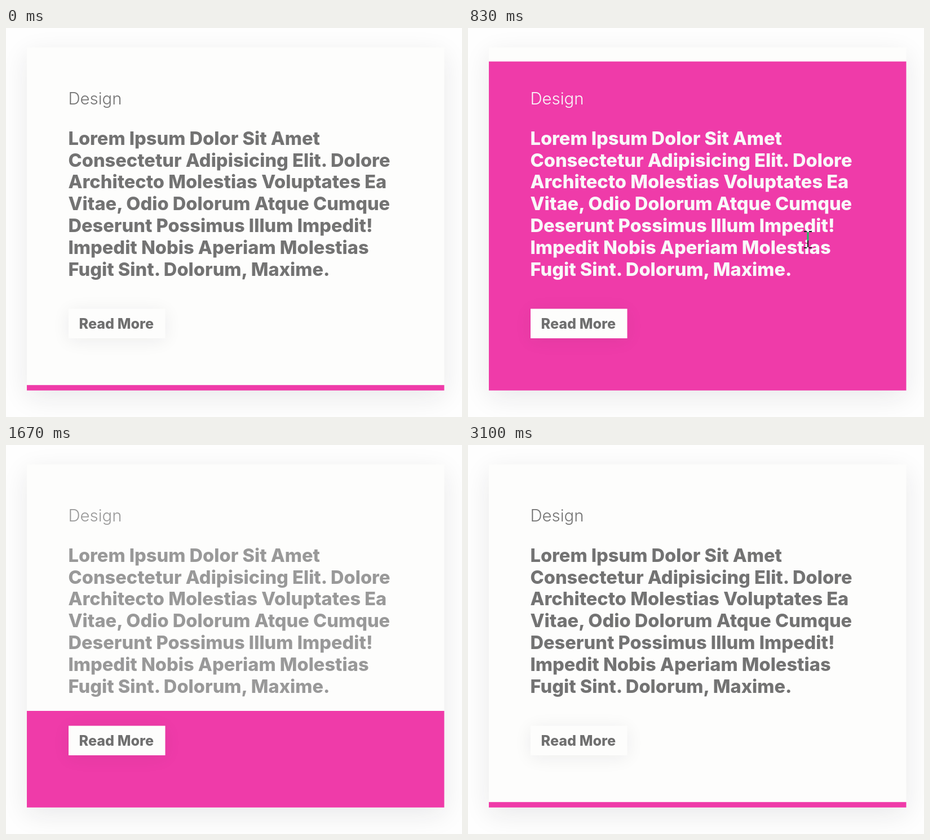
An HTML page for the animation above (3130 ms loop, 809 by 692 pixels).

```html
<!DOCTYPE html>
<html lang="en">
<head>
<meta charset="utf-8">
<title>Card hover</title>
<style>
  html, body { margin: 0; width: 100%; height: 100%; overflow: hidden; background: #fefefe; }
  svg { display: block; width: 809px; height: 692px; }
  text { font-family: Inter, "Open Sans", sans-serif; font-weight: 800; }
  #label { font-size: 29.3px; font-weight: 300; }
  #heading { font-size: 32.6px; }
  #more { font-size: 25.2px; fill: #6f6f6f; }
  #beam { fill: none; stroke: #10251a; stroke-width: 2; }
</style>
</head>
<body>
<svg viewBox="0 0 809 692">
  <defs>
    <filter id="wide" x="-20%" y="-20%" width="140%" height="140%"><feGaussianBlur stdDeviation="24"/></filter>
    <filter id="soft" x="-50%" y="-100%" width="200%" height="300%"><feGaussianBlur stdDeviation="16"/></filter>
  </defs>
  <rect width="809" height="692" fill="#fefefe"/>
  <rect x="37" y="47" width="740.5" height="610" fill="#1c1c28" opacity=".09" filter="url(#wide)"/>
  <rect x="37" y="34.5" width="740.5" height="610.5" fill="#fdfdfc"/>
  <rect id="fill" x="37" width="740.5" fill="#ef3ba9"/>
  <g id="copy">
    <text id="label" x="110.5" y="136">Design</text>
    <g id="heading"></g>
  </g>
  <rect x="111" y="504" width="171.5" height="52" fill="#1c1c28" opacity=".07" filter="url(#soft)"/>
  <rect x="111" y="499.5" width="171.5" height="52.5" fill="#fdfdfc"/>
  <text id="more" x="129.5" y="535">Read More</text>
  <path id="arrow" d="M.5.5V31L7.5 24.5 12.5 35 17 33 12.3 22.5H22.5Z" fill="#fff" stroke="#111" stroke-width="1.1"/>
  <g id="beam">
    <path d="M-7-15H-2M2-15H7M-7 14H-2M2 14H7M0 0V13"/>
    <path d="M0-14V1" stroke="#17c05a" stroke-width="3"/>
  </g>
</svg>
<script>
const LOOP = 3130, DURATION = 480, ENTER = 474, LEAVE = 1462;
const BOTTOM = 644.8, BAR = 9.6, CARD = 610.3;
const lines = [
  "Lorem Ipsum Dolor Sit Amet",
  "Consectetur Adipisicing Elit. Dolore",
  "Architecto Molestias Voluptates Ea",
  "Vitae, Odio Dolorum Atque Cumque",
  "Deserunt Possimus Illum Impedit!",
  "Impedit Nobis Aperiam Molestias",
  "Fugit Sint. Dolorum, Maxime."
];
const $ = id => document.getElementById(id);
const clamp = v => Math.min(1, Math.max(0, v));
const mix = (a, b, u) => a + (b - a) * u;

$("heading").innerHTML = lines
  .map((line, i) => `<text x="110.5" y="${207.7 + i * 38.85}">${line}</text>`).join("");

// CSS "ease": cubic-bezier(.25, .1, .25, 1)
function ease(x) {
  if (x <= 0 || x >= 1) return clamp(x);
  const curve = (a, b, s) => 3 * s * (1 - s) ** 2 * a + 3 * s * s * (1 - s) * b + s ** 3;
  let low = 0, high = 1;
  for (let i = 0; i < 24; i++) {
    const s = (low + high) / 2;
    if (curve(.25, .25, s) < x) low = s; else high = s;
  }
  return curve(.1, 1, low);
}

// Pointer path: start time, end time, from, to, easing
const easeOut = u => 1 - (1 - u) ** 2;
const moves = [
  [425, 570, [648, 700], [606, 396], easeOut],
  [570, 680, [606, 396], [603, 377], easeOut],
  [680, 1150, [603, 377], [603, 377], u => u],
  [1150, 1430, [603, 377], [635, 656], u => u * u],
  [1430, 1460, [635, 656], [640, 700], u => u]
];

function pointerAt(t) {
  const move = moves.find(([start, end]) => t >= start && t < end);
  if (!move) return null;
  const [start, end, from, to, curve] = move;
  const u = curve((t - start) / (end - start));
  return [mix(from[0], to[0], u), mix(from[1], to[1], u)];
}

function place(node, visible, point) {
  node.style.display = visible ? "" : "none";
  if (visible) node.setAttribute("transform", `translate(${point.map(Math.round)})`);
}

function draw(t) {
  const hover = t < LEAVE
    ? ease((t - ENTER) / DURATION)
    : 1 - ease((t - LEAVE) / DURATION);
  const height = mix(BAR, CARD, hover);
  $("fill").setAttribute("y", BOTTOM - height);
  $("fill").setAttribute("height", height);
  const shade = Math.round(mix(115, 255, hover));
  $("copy").setAttribute("fill", `rgb(${shade},${shade},${shade})`);

  const point = pointerAt(t);
  const overText = point && t > 590 && point[1] < 410;
  place($("arrow"), point && !overText, point);
  place($("beam"), overText, point);
}

const began = performance.now();
function tick() {
  draw((performance.now() - began) % LOOP);
  requestAnimationFrame(tick);
}
draw(0);
requestAnimationFrame(tick);
</script>
</body>
</html>
```
